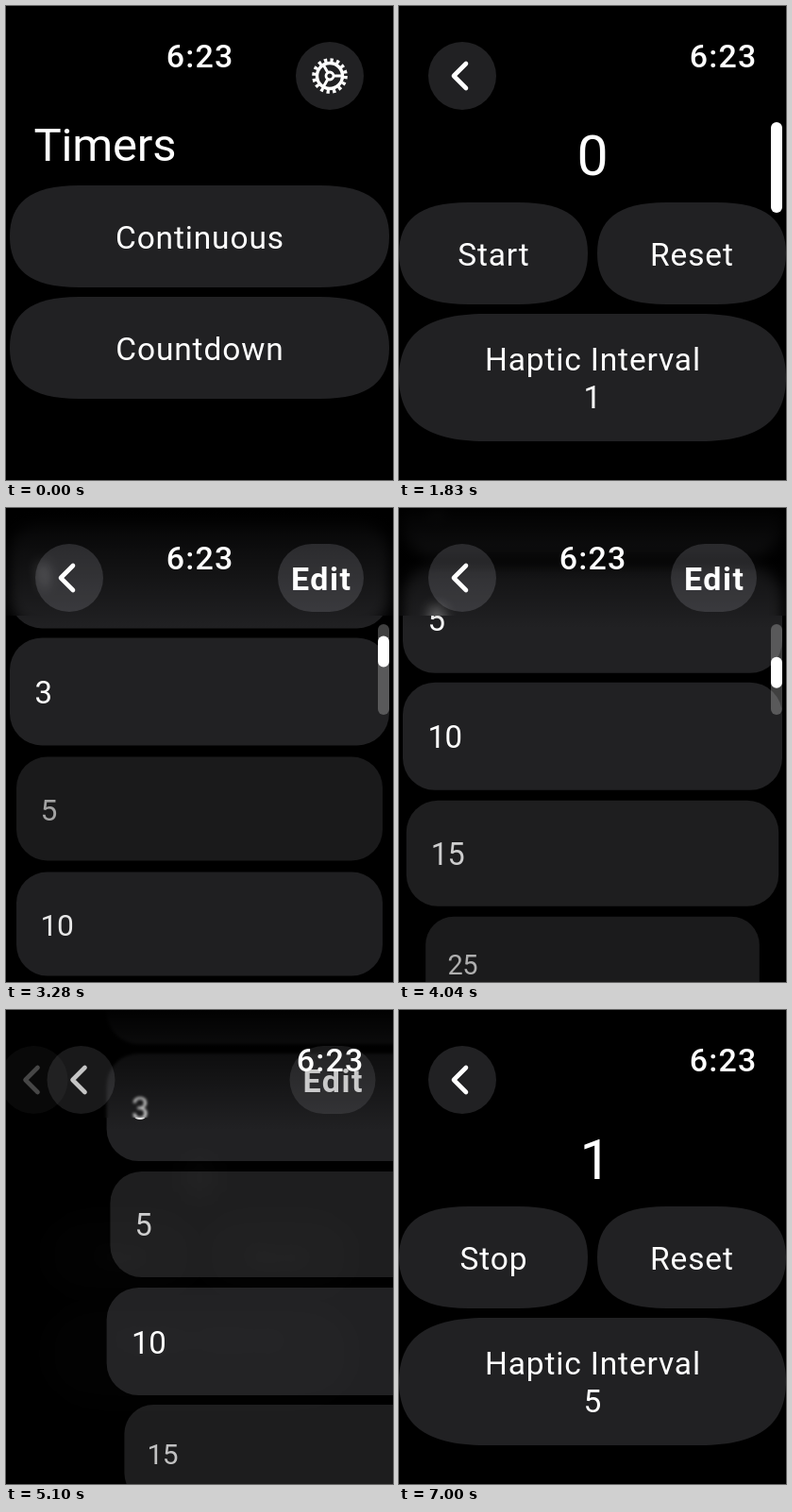
Animation of 410 by 502 pixels, one loop 8000 ms. Source, as an HTML page with a canvas:

```html
<!DOCTYPE html>
<html lang="en">
<head>
<meta charset="utf-8">
<title>Watch timers</title>
<style>
  html, body { margin: 0; width: 100%; height: 100%; overflow: hidden; background: #000; }
  canvas { display: block; width: 410px; height: 502px; }
</style>
</head>
<body>
<canvas id="stage"></canvas>
<script>
const W = 410, H = 502, LOOP = 8000;
const FILL = 'rgba(240,240,250,.139)';
const INTERVALS = [1, 3, 5, 10, 15, 25, 30, 45];
const canvas = document.getElementById('stage');
const dpr = window.devicePixelRatio || 1;
canvas.width = W * dpr;
canvas.height = H * dpr;
const ctx = canvas.getContext('2d');

const clamp = v => Math.max(0, Math.min(1, v));
const ramp = (t, start, length) => clamp((t - start) / length);
const cubic = (t, start, length) => {
  const k = ramp(t, start, length);
  return k < .5 ? 4 * k ** 3 : 1 - (2 - 2 * k) ** 3 / 2;
};
const sine = (t, start, length) => .5 - .5 * Math.cos(Math.PI * ramp(t, start, length));
// Finger down at `a`, fully released at `b`
const press = (t, a, b) => Math.min(ramp(t, a, 100), ramp(b - t, 0, 100));

function scoped(alpha, draw) {
  ctx.save();
  ctx.globalAlpha *= alpha;
  draw();
  ctx.restore();
}

function scaleAbout(x, y, k) {
  ctx.translate(x, y);
  ctx.scale(k, k);
  ctx.translate(-x, -y);
}

function blur(px) {
  ctx.filter = px > .1 ? `blur(${px * dpr}px)` : 'none';
}

function text(str, x, y, { size = 33.5, weight = 400, spacing = .85, align = 'center' } = {}) {
  ctx.font = `${weight} ${size}px Roboto, sans-serif`;
  ctx.letterSpacing = spacing + 'px';
  ctx.textAlign = align;
  ctx.fillStyle = '#fff';
  ctx.fillText(str, x + (align === 'center' ? spacing / 2 : 0), y + size * .355);
}

function box(x, y, w, h, r, fill = FILL) {
  ctx.beginPath();
  ctx.roundRect(x, y, w, h, r);
  ctx.fillStyle = fill;
  ctx.fill();
}

// Pill with softened, continuous corners
function pill(x, y, w, h) {
  const r = h / 2, ext = r * 1.35, a = r * .38, b = r * .36;
  const R = x + w, B = y + h, m = y + r;
  ctx.beginPath();
  ctx.moveTo(x, m);
  ctx.bezierCurveTo(x, y + b, x + a, y, x + ext, y);
  ctx.lineTo(R - ext, y);
  ctx.bezierCurveTo(R - a, y, R, y + b, R, m);
  ctx.bezierCurveTo(R, B - b, R - a, B, R - ext, B);
  ctx.lineTo(x + ext, B);
  ctx.bezierCurveTo(x + a, B, x, B - b, x, m);
  ctx.fillStyle = FILL;
  ctx.fill();
}

function button(x, y, w, h, lines, pressed = 0) {
  scoped(1 - .3 * pressed, () => {
    scaleAbout(x + w / 2, y + h / 2, 1 - .035 * pressed);
    pill(x, y, w, h);
    const top = y + h / 2 + 1 - (lines.length - 1) * 20;
    lines.forEach((line, i) => text(line, x + w / 2, top + i * 40));
  });
}

function timersPage(t) {
  text('Timers', 29.5, 147, { size: 49, spacing: -.2, align: 'left' });
  button(4, 190, 402, 108, ['Continuous'], press(t, 1150, 1380));
  button(4, 308, 402, 108, ['Countdown']);
}

function detailPage(t) {
  text(t < 7000 ? '0' : '1', t < 7000 ? 205 : 208, 158, { size: 59, spacing: 0 });
  button(0, 208, 200, 108, [t < 6090 ? 'Start' : 'Stop'], press(t, 5960, 6230));
  button(210, 208, 200, 108, ['Reset']);
  button(0, 326, 410, 135, ['Haptic Interval', t < 4900 ? '1' : '5'], press(t, 2350, 2570));
  const bar = 1 - ramp(t, 1850, 190);
  if (bar > 0) scoped(bar, () => box(394, 123, 12, 96, 6, '#fff'));
}

function listRows(t, scroll) {
  const touched = {
    2: Math.max(press(t, 3040, 3430), press(t, 4870, 5155)),
    4: press(t, 3710, 4095)
  };
  INTERVALS.forEach((value, i) => {
    const y = 128 + i * 124 - scroll;
    if (y > H - 6 || y < -130) return;
    const low = Math.max(0, y - 366), down = touched[i] || 0;
    const alpha = Math.max(0, 1 - .0052 * low) * (1 - .4 * down);
    ctx.save();
    scaleAbout(205, y, 1 - .0018 * low);
    scaleAbout(205, y + 57, 1 - .035 * down);
    scoped(Math.sqrt(alpha), () => box(4, y, 402, 114, 34));
    scoped(alpha, () => text(value, 30.5, y + 58, { size: 33, spacing: -.5, align: 'left' }));
    ctx.restore();
  });
}

function listPage(t, shown) {
  const scroll = 172 * sine(t, 3050, 380) + 188 * sine(t, 3710, 490) - 154 * sine(t, 4470, 390);
  const softness = 1.5 + 5.5 * clamp(1 - 4 * (1 - shown));
  // Rows blur while they pass below the header
  [[-20, 134, softness], [114, 400, 0]].forEach(([y, h, soft]) => {
    ctx.save();
    ctx.beginPath();
    ctx.rect(-20, y, W + 40, h);
    ctx.clip();
    blur(soft);
    listRows(t, scroll);
    ctx.restore();
  });
  const shade = ctx.createLinearGradient(0, 0, 0, 128);
  shade.addColorStop(0, 'rgba(0,0,0,.97)');
  shade.addColorStop(.35, 'rgba(0,0,0,.6)');
  shade.addColorStop(1, 'rgba(0,0,0,0)');
  ctx.fillStyle = shade;
  ctx.fillRect(0, 0, W, 128);
  box(394, 123, 12, 96, 6, 'rgba(255,255,255,.25)');
  box(394, 123 + .11 * scroll, 12, 33, 6, '#fff');
}

// A page slides in from the right, then sinks back when covered
function page(draw, t, slide, cover = 0, sink = 0) {
  if (slide <= 0 || cover >= 1) return;
  scoped((1 - cover) ** 2, () => {
    ctx.translate(W * (1 - slide), 0);
    scaleAbout(W / 2, H / 2, 1 - .28 * sink);
    blur(16 * sink);
    draw(t, slide);
  });
}

function circle(x, y, r) {
  ctx.beginPath();
  ctx.arc(x, y, r, 0, Math.PI * 2);
}

function stroke(width) {
  ctx.strokeStyle = '#fff';
  ctx.lineWidth = width;
  ctx.stroke();
}

function gear() {
  box(307, 38, 72, 72, 36);
  ctx.translate(343, 74);
  circle(0, 0, 13.5);
  stroke(3.4);
  circle(0, 0, 4);
  stroke(2.8);
  for (let i = 0; i < 3; i++) {
    const a = i * Math.PI * 2 / 3;
    ctx.beginPath();
    ctx.moveTo(5 * Math.cos(a), 5 * Math.sin(a));
    ctx.lineTo(13 * Math.cos(a), 13 * Math.sin(a));
    stroke(3);
  }
  const tooth = 2 * Math.PI * 16.8 / 32;
  ctx.setLineDash([tooth, tooth]);
  circle(0, 0, 16.8);
  stroke(4);
}

function back() {
  box(31, 38, 72, 72, 36);
  ctx.beginPath();
  ctx.moveTo(71, 61);
  ctx.lineTo(58, 74);
  ctx.lineTo(71, 87);
  ctx.lineCap = ctx.lineJoin = 'round';
  stroke(4.6);
}

function listTools() {
  back();
  box(288, 38, 91, 72, 36);
  text('Edit', 333.5, 75, { size: 34, weight: 600, spacing: 1.5 });
}

function tools(draw, shift, alpha) {
  if (alpha <= 0) return;
  scoped(alpha, () => {
    ctx.translate(50 * shift, 0);
    draw();
  });
}

function render(t) {
  const push1 = cubic(t, 1230, 310), bar1 = cubic(t, 1230, 235);
  const pop = cubic(t, 4970, 330);
  const push2 = cubic(t, 2451, 310) - pop, bar2 = cubic(t, 2450, 235) - pop;
  const clock = cubic(t, 1230, 205) - cubic(t, 2450, 205) + cubic(t, 4900, 185);

  ctx.setTransform(dpr, 0, 0, dpr, 0, 0);
  ctx.fillStyle = '#000';
  ctx.fillRect(0, 0, W, H);
  page(timersPage, t, 1, push1, bar1);
  page(detailPage, t, push1, push2, bar2);
  page(listPage, t, push2);
  tools(gear, -bar1, 1 - bar1);
  tools(back, 1 - bar1 - bar2, bar1 * (1 - bar2));
  tools(listTools, 1 - bar2, bar2);
  text('6:23', 205 + 138 * clock, 53, { size: 34, weight: 500, spacing: 1.2 });
}

const begin = performance.now();
function tick() {
  render((performance.now() - begin) % LOOP);
  requestAnimationFrame(tick);
}
tick();
</script>
</body>
</html>
```
